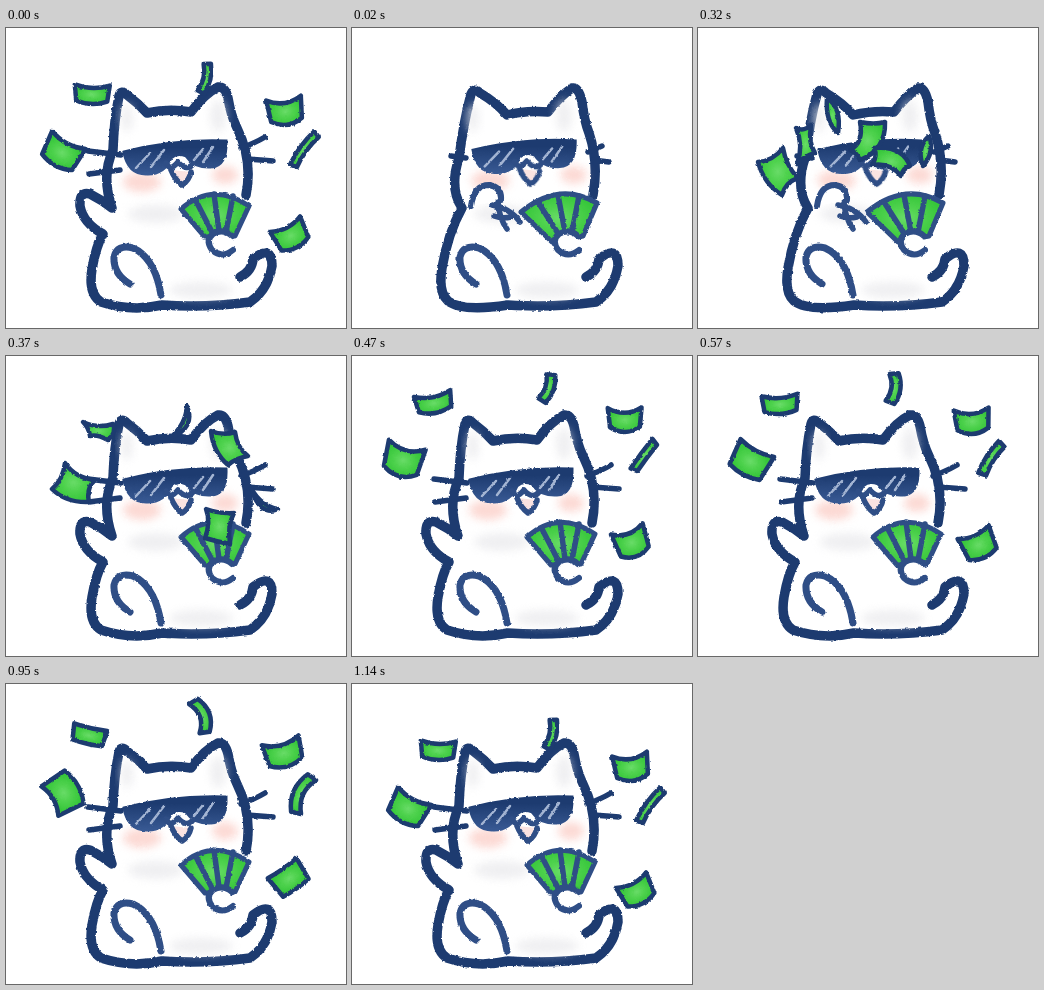
An HTML page that plays this animation: 340x300 px, repeating every 1.3 s.

```html
<!DOCTYPE html>
<html lang="en">
<head>
<meta charset="utf-8">
<title>Cool cat tossing cash</title>
<style>
  html, body { margin: 0; width: 100%; height: 100%; overflow: hidden; background: #fff; }
  #stage { position: relative; width: 340px; height: 300px; overflow: hidden; }
  #film { display: block; position: absolute; left: 0; top: 0; animation: play 1.3s step-end infinite; }
  .ink { fill: none; stroke: #1d3b70; stroke-width: 6; stroke-linecap: round; stroke-linejoin: round; }
  .soft { stroke: #2f4e86; filter: url(#smooth); }
  .body { fill: #fff; stroke-width: 9.5; }
  .paw { fill: #fff; }
  .thin { stroke-width: 5.5; }
  .leg { stroke-width: 7; }
  .lips { fill: #fbe3e1; }
  .fan { fill: url(#cash); stroke-width: 5; }
  .bill { fill: url(#cash); stroke-width: 4.5; }
  .shades { fill: url(#lens); stroke: url(#lens); stroke-width: 3; }
  .glare { fill: none; stroke: #a4b5d3; stroke-width: 2.5; stroke-linecap: round; }
  .blush { fill: #fbcdc6; filter: url(#blur); opacity: .75; }
  .shade { fill: #e9e9ec; filter: url(#blur); opacity: .7; }
  /* one cell of the strip per drawing, 340px apart */
  @keyframes play {
    0%       { transform: translateX(0); }
    1.5385%  { transform: translateX(-340px); }
    9.2308%  { transform: translateX(-680px); }
    24.6154% { transform: translateX(-1020px); }
    28.4615% { transform: translateX(-1360px); }
    36.1538% { transform: translateX(-1700px); }
    43.8462% { transform: translateX(-2040px); }
    58.4615% { transform: translateX(-2380px); }
    73.0769% { transform: translateX(-2720px); }
    87.6923%, 100% { transform: translateX(0); }
  }
</style>
</head>
<body>
<div id="stage"></div>
<script>
// outlines run clockwise from the inside of the foot to the right cheek
const foot = 'M234 249Q246 243 247 231Q266 216 266 238Q262 262 244 274Q200 280 156 277';
const leg = 'M124 256Q107 246 108 229Q111 216 127 220Q149 230 155 267';

const poses = {
  toss: {
    body: `${foot}Q125 284 95 274Q82 266 86 241Q90 218 97 206Q77 195 74 178Q73 163 84 166
      Q96 172 106 180Q95 148 107 122Q108 92 113 68Q115 61 121 67Q132 75 141 85Q163 80 185 84
      Q198 66 212 59Q219 58 222 70Q225 88 231 100Q247 132 240 167`,
    leg,
    whiskers: 'M82 123L115 127M83 146L114 142M235 120Q249 115 259 109M241 131L267 133',
    face: '',
    open: true,
    fan: 'M175 181Q206 153 243 178L229 208L199 209Z',
    ribs: 'M190 173L207 206M208 166L213 203M227 168L220 204'
  },
  hide: {
    body: `${foot}Q120 281 105 274Q93 266 99 240Q102 205 118 180Q104 158 113 130Q117 92 130 65
      Q134 59 139 65Q150 74 159 86Q177 82 194 84Q207 68 220 62Q227 61 230 74Q233 92 238 105
      Q247 135 241 167`,
    leg: 'M126 246Q114 232 123 221Q139 212 149 231Q156 250 157 272',
    whiskers: 'M111 119L121 123M241 126L262 118M244 134L264 140',
    face: 'translate(8 -2) rotate(3 170 125)',
    open: false,
    fan: 'M168 177Q202 155 243 177L231 208L200 214Z',
    ribs: 'M189 170L208 206M213 166L215 203M179 172L203 207',
    arm: 'M158 186Q174 181 185 196Q191 205 182 207Q172 211 160 215'
  },
  windup: {
    body: `${foot}Q110 284 96 273Q86 264 90 240Q96 205 110 180Q97 160 107 130Q112 92 119 66
      Q122 59 128 65Q145 75 155 87Q176 82 196 84Q208 68 220 60Q227 59 230 74Q232 92 237 105
      Q247 135 241 167`,
    leg,
    whiskers: 'M99 128L114 130M236 124L250 118M241 132L257 134',
    face: 'translate(3 -1) rotate(1 170 125)',
    open: true,
    fan: 'M169 184Q207 153 245 175L231 208L200 214Z',
    ribs: 'M186 174L207 207M206 167L213 204M227 168L220 204',
    arm: 'M119 178Q122 157 137 157Q150 159 149 172',
    fingers: 'M140 177Q158 180 168 194M142 188Q150 191 159 189M146 174Q147 190 155 201'
  }
};

const burst = [
  'M60 134Q75 133 85 120Q88 138 100 150Q88 154 84 167Q66 156 60 134Z',
  'M98 100Q106 104 113 97Q110 115 117 125Q106 128 99 136Q106 118 98 100Z',
  'M129 70Q144 80 140 105Q127 94 129 70Z',
  'M162 94Q176 97 187 94Q188 122 162 132Q158 124 152 122Q166 115 162 94Z',
  'M176 120Q204 117 212 138Q205 140 203 148Q192 134 174 137Q180 128 176 120Z',
  'M231 108Q218 120 225 138Q237 124 231 108Z'
];
const spread = [
  'M77 66Q92 73 107 68Q111 76 102 84Q91 78 84 80Q83 72 77 66Z',
  'M59 107Q69 122 89 124Q80 132 83 146Q60 147 46 133Q57 124 59 107Z',
  'M181 50Q190 72 164 82Q180 68 181 50Z',
  'M205 75Q217 80 229 76Q231 92 242 100Q230 102 222 109Q207 96 205 75Z',
  'M200 153Q214 158 228 157Q221 170 224 188Q212 186 199 182Q205 166 200 153Z',
  'M245 132Q255 150 272 153Q254 161 245 132Z'
];

// each bill: x, y, width, height, angle, bend
const high = [
  [82, 47, 36, 16, -4, 3], [53, 104, 38, 27, 28, 3], [194, 32, 31, 9, 98, -4],
  [274, 63, 35, 20, -5, 5], [294, 103, 38, 8, -57, -2], [280, 187, 34, 24, -24, 4]
];
const drift = [
  [83, 51, 34, 16, 13, 1], [56, 110, 38, 28, 60, -4], [193, 33, 35, 10, 70, -6],
  [277, 67, 38, 22, -15, 5], [298, 111, 41, 10, -66, -6], [283, 194, 35, 24, -35, 1]
];
const low = [
  [86, 65, 35, 16, 2, 3], [57, 123, 38, 25, 28, 4], [198, 50, 31, 7, 103, -3],
  [279, 81, 35, 22, -8, 5], [299, 122, 41, 7, -54, -2], [284, 206, 34, 22, -27, 4]
];

const mix = (a, b, k) => a.map((row, i) => row.map((v, j) => v + (b[i][j] - v) * k));
const path = (cls, d, extra = '') => d ? `<path class="${cls}" d="${d}" ${extra}/>` : '';
const oval = (cls, x, y, rx, ry) => `<ellipse class="${cls}" cx="${x}" cy="${y}" rx="${rx}" ry="${ry}"/>`;

function bill([x, y, w, h, angle, bend]) {
  const a = w / 2, b = h / 2, s = bend * 2;
  const d = `M${-a} ${-b}Q0 ${s - b} ${a} ${-b}L${a - 2} ${b}Q0 ${b + s} ${2 - a} ${b}Z`;
  return path('ink bill', d, `transform="translate(${x} ${y}) rotate(${angle})"`);
}

function face(p) {
  const mouth = p.open
    ? path('ink soft thin lips', 'M165 142Q169 152 176 157Q183 153 185 144') +
      path('ink soft thin', 'M160 135Q164 144 172 134Q181 144 187 136')
    : path('ink soft thin', 'M156 144Q164 150 170 138Q179 149 186 141');
  return `<g transform="${p.face}">` +
    oval('blush', 136, 154, 19, 10) + oval('blush', 219, 147, 13, 9) +
    path('shades', 'M118 124Q168 111 220 113Q221 138 205 139Q188 140 180 128Q171 124 165 130Q158 147 140 146Q122 146 118 124Z') +
    path('glare', 'M130 140L144 125M145 139L158 122M188 132L197 121M197 134L207 119') +
    mouth + '</g>';
}

const cat = p =>
  path('ink body', p.body) +
  oval('shade', 150, 186, 28, 9) + oval('shade', 195, 262, 32, 8) +
  oval('shade', 121, 90, 6, 14) + oval('shade', 212, 88, 8, 16) +
  path('ink soft leg', p.leg) + path('ink thin', p.whiskers) + face(p) +
  path('ink soft fan', p.fan) + path('ink soft thin', p.ribs) +
  path('ink soft paw', 'M227 222Q216 231 206 222Q199 212 207 206Q217 200 226 208') +
  path('ink soft paw', p.arm) + path('ink soft thin', p.fingers);

const outlines = list => list.map(d => path('ink bill', d)).join('');
const flying = rows => rows.map(bill).join('');

const { toss, hide, windup } = poses;
const cells = [
  [toss, flying(low)],
  [windup, ''],
  [hide, ''],
  [windup, outlines(burst)],
  [toss, outlines(spread)],
  [toss, flying(mix(high, drift, -.4))],
  [toss, flying(high)],
  [toss, flying(mix(high, drift, .5))],
  [toss, flying(drift)]
];

// a fresh noise seed per drawing makes the crayon edge wobble
const rough = cells.map((_, i) => `
  <filter id="rough${i}" filterUnits="userSpaceOnUse" x="0" y="0" width="340" height="300" color-interpolation-filters="sRGB">
    <feTurbulence type="fractalNoise" baseFrequency=".3" numOctaves="2" seed="${i + 3}"/>
    <feDisplacementMap in="SourceGraphic" scale="2.5" xChannelSelector="R" yChannelSelector="G"/>
  </filter>`).join('');

const blur = (id, size) => `
  <filter id="${id}" x="-50%" y="-50%" width="200%" height="200%" color-interpolation-filters="sRGB">
    <feGaussianBlur stdDeviation="${size}"/>
  </filter>`;

document.getElementById('stage').innerHTML = `
<svg id="film" width="${cells.length * 340}" height="300">
  <defs>
    <radialGradient id="cash">
      <stop offset="0" stop-color="#69dc68"/>
      <stop offset=".45" stop-color="#4fd24e"/>
      <stop offset="1" stop-color="#36c63a"/>
    </radialGradient>
    <linearGradient id="lens" x2="0" y2="1">
      <stop offset=".2" stop-color="#1d3b70"/>
      <stop offset="1" stop-color="#385993"/>
    </linearGradient>
    ${blur('blur', 4)}${blur('smooth', .6)}${rough}
  </defs>
  ${cells.map(([p, money], i) =>
    `<g transform="translate(${i * 340})"><g filter="url(#rough${i})">${cat(p)}${money}</g></g>`).join('')}
</svg>`;
</script>
</body>
</html>
```
